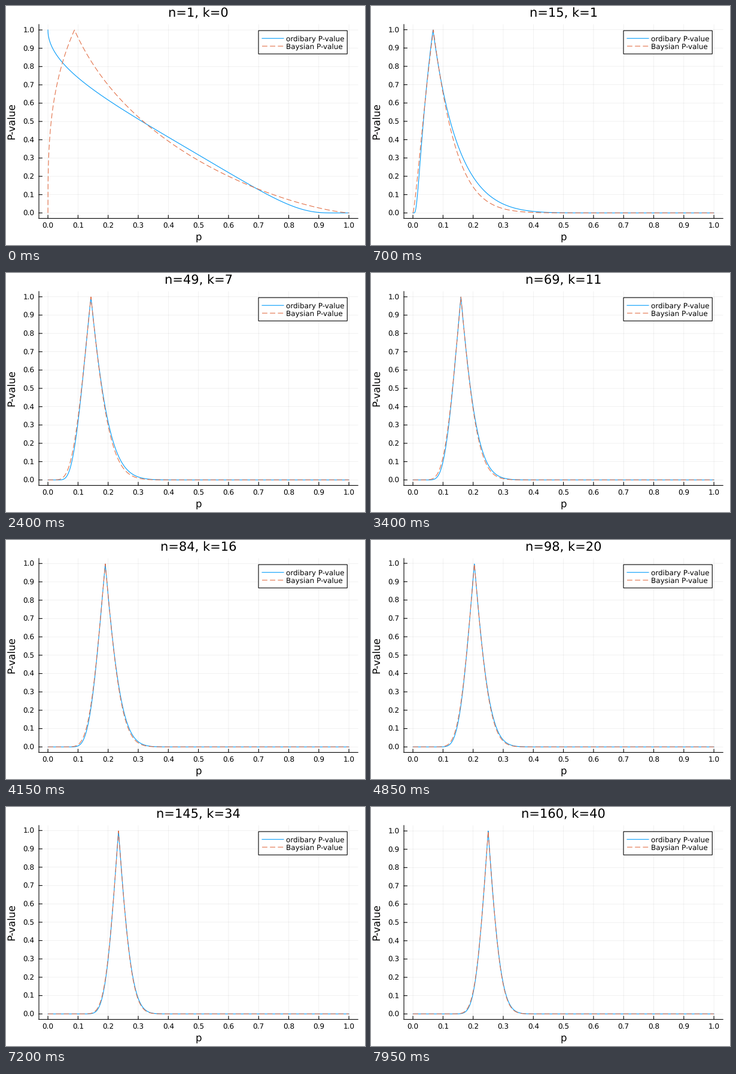
Animation of 600x400 px, one loop 8000 ms. Source, as a matplotlib script:

```python
import math

import matplotlib.pyplot as plt
import numpy as np
from matplotlib.animation import FuncAnimation

W, H, DPI = 600, 400, 100
PX = 72 / DPI                      # points per pixel
LEFT, RIGHT, TOP, BOTTOM = 55.0, 588.2, 30.9, 355.5
PAD = 0.03                         # margin on each side of the data range
FRAMES, INTERVAL = 160, 50
BLUE, ORANGE = "#009afa", "#e26f46"

plt.rcParams.update({
    "font.family": "DejaVu Sans",
    "text.hinting": "none",
    "path.simplify": False,
    "path.snap": False,
})

# Successes k seen after n trials, filled in between these points
TRIALS = [1, 30, 69, 98, 119, 145, 160]
SUCCESSES = [0, 3, 11, 20, 27, 34, 40]

p = np.linspace(0, 1, 2561)
u = np.linspace(0, 1, 6001)
log_u = np.log(np.maximum(u, 1e-300))
log_v = np.log(np.maximum(1 - u**3, 1e-300))
erfc = np.vectorize(math.erfc, otypes=[float])


def ordinary(n, k):
    """Two-sided P-value of the normal approximation."""
    sd = np.sqrt(np.maximum(n * p * (1 - p), 1e-12))
    return erfc(np.abs(k - n * p) / sd / math.sqrt(2))


def bayesian(n, k):
    """Two-sided tail of the posterior Beta(k + 1/3, n - k + 1/3)."""
    # substituting t = u^3 removes the singularity at t = 0
    logs = 3 * k * log_u + (n - k - 2 / 3) * log_v
    density = np.exp(logs - logs.max())
    cdf = np.concatenate([[0], np.cumsum(density[1:] + density[:-1])])
    cdf = np.interp(np.cbrt(p), u, cdf / cdf[-1])
    return 2 * np.minimum(cdf, 1 - cdf)


def to_x(value):
    return LEFT + (value + PAD) / (1 + 2 * PAD) * (RIGHT - LEFT)


def to_y(value, peak):
    return BOTTOM - (value / peak + PAD) / (1 + 2 * PAD) * (BOTTOM - TOP)


fig = plt.figure(figsize=(W / DPI, H / DPI), dpi=DPI, facecolor="white")
ax = fig.add_axes([0, 0, 1, 1])
ax.set_xlim(0, W)
ax.set_ylim(H, 0)
ax.axis("off")


def line(xs, ys, color="black", width=1.1, **kw):
    return ax.plot(xs, ys, color=color, lw=width * PX, **kw)[0]


def text(x, y, label, size, ha="center", **kw):
    return ax.text(x, y, label, fontsize=size * PX, ha=ha, va="baseline",
                   rotation_mode="anchor", **kw)


grid = dict(width=0.55, alpha=0.1, zorder=1)
dashed = dict(linestyle=(0, (8, 4)))
ticks = np.arange(11) / 10
y_grid, y_marks, y_labels = [], [], []
DROP = 4.7                         # from a tick down to its label's baseline

for t in ticks:
    x, y = to_x(t), to_y(t, 1)
    line([x, x], [TOP, BOTTOM], **grid)
    line([x, x], [BOTTOM, BOTTOM - 5.3], zorder=2)
    text(x, 371.9, f"{t:.1f}", 12)
    y_grid.append(line([LEFT, RIGHT], [y, y], **grid))
    y_marks.append(line([LEFT, LEFT + 5.3], [y, y], zorder=2))
    y_labels.append(text(47.5, y + DROP, f"{t:.1f}", 12, ha="right"))

line([LEFT, LEFT], [TOP, BOTTOM], zorder=2)
line([LEFT, RIGHT], [BOTTOM, BOTTOM], zorder=2)

curve_a = line([], [], BLUE, zorder=3)
curve_b = line([], [], ORANGE, zorder=3, **dashed)

center = (LEFT + RIGHT) / 2
title = text(center, 18.2, "", 21)
text(center, 392, "p", 16.5)
text(15, (TOP + BOTTOM) / 2 - 0.8, "P-value", 16.8, rotation=90)

ax.add_patch(plt.Rectangle((422, 41.2), 148.3, 39, facecolor="white",
                           edgecolor="black", lw=1.1 * PX, zorder=4))
for y, color, label, style in ((54.2, BLUE, "ordibary P-value", {}),
                               (67.2, ORANGE, "Baysian P-value", dashed)):
    line([428, 464], [y, y], color, zorder=5, **style)
    text(468, y + 4.4, label, 12, ha="left", zorder=5)


def update(i):
    n = i + 1
    k = int(np.rint(np.interp(n, TRIALS, SUCCESSES)))
    a, b = ordinary(n, k), bayesian(n, k)
    peak = max(a.max(), b.max())
    curve_a.set_data(to_x(p), to_y(a, peak))
    curve_b.set_data(to_x(p), to_y(b, peak))
    title.set_text(f"n={n}, k={k}")
    for t, rule, mark, label in zip(ticks, y_grid, y_marks, y_labels):
        y = to_y(t, peak)
        rule.set_ydata([y, y])
        mark.set_ydata([y, y])
        label.set_y(y + DROP)
    return []


anim = FuncAnimation(fig, update, frames=FRAMES, interval=INTERVAL,
                     repeat=True, repeat_delay=0, blit=False)
plt.show()
```
